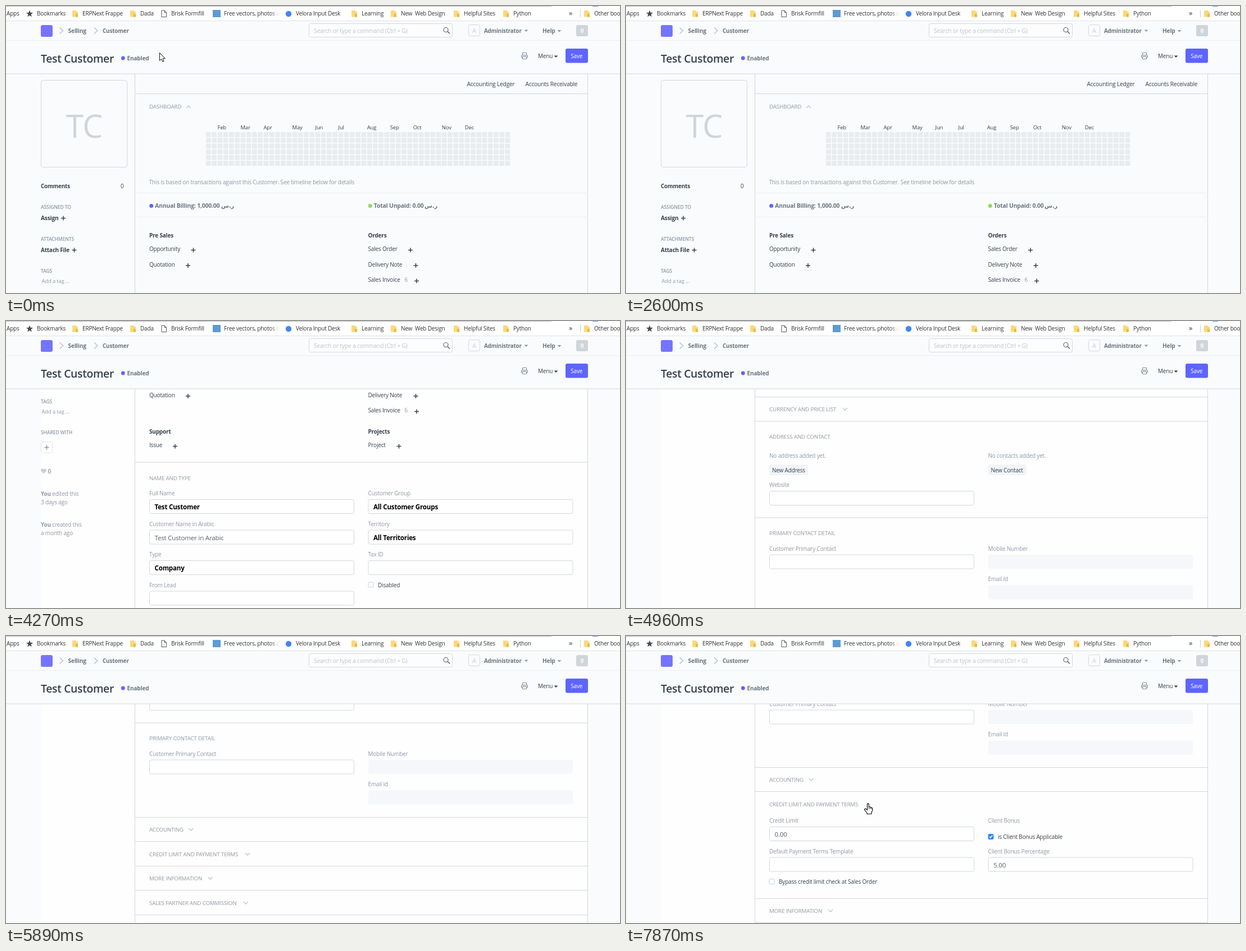
Write an HTML page with a canvas that moves like this. It is 1093 px wide and 512 px high and loops after 8000 ms.

```html
<!DOCTYPE html>
<html lang="en">
<head>
<meta charset="utf-8">
<title>Customer form</title>
<style>
html, body { margin: 0; width: 100%; height: 100%; overflow: hidden; background: #fafbfd; }
canvas { display: block; width: 1093px; height: 512px; }
</style>
</head>
<body>
<canvas id="stage" width="1093" height="512"></canvas>
<script>
const ctx = document.getElementById('stage').getContext('2d');
const LOOP = 8000, W = 1093, H = 512, TOP = 121;
const INK = '#36414c', MUTED = '#8d99a6', BORDER = '#d1d8dd', FAINT = '#ebeff2', ACCENT = '#5e64ff';
const LEFT = 255, RIGHT = 644.5;

// Time, then values
const SCROLL = [[4000, 0], [4270, 328], [4480, 545], [4810, 545], [4960, 723],
  [5310, 872], [5440, 908], [5860, 908], [6130, 1008]];
const POINTER = [[480, 273, 83], [760, 205, 42], [960, 150, 56], [1280, 64, 84], [1300, 64, 84],
  [1480, 270, 86], [1640, 490, 114], [1900, 938, 212], [2110, 938, 212], [2350, 1028, 218], [2590, 1096, 240]];
const RETURN = [[6440, 1066, 452], [6700, 880, 392], [7000, 560, 322], [7220, 439, 301], [7245, 438, 299], [7380, 431, 298]];

function track(keys, t) {
  if (t <= keys[0][0]) return keys[0].slice(1);
  for (let i = 1; i < keys.length; i++) {
    const a = keys[i - 1], b = keys[i];
    if (t < b[0]) {
      const k = (t - a[0]) / (b[0] - a[0]);
      return a.slice(1).map((v, j) => v + (b[j + 1] - v) * k);
    }
  }
  return keys[keys.length - 1].slice(1);
}

function text(str, x, y, color = INK, size = 10, weight = 400, align = 'left') {
  ctx.font = `${weight} ${size}px "Open Sans", "Noto Sans", sans-serif`;
  ctx.letterSpacing = `${-0.018 * size}px`;
  ctx.textAlign = align;
  ctx.fillStyle = color;
  ctx.fillText(str, x, y);
}
const bold = (str, x, y, color = INK, size = 10) => text(str, x, y, color, size, 700);
const label = (str, x, y) => text(str, x, y, MUTED);

function rect(x, y, w, h, color) {
  ctx.fillStyle = color;
  ctx.fillRect(x, y, w, h);
}
function box(x, y, w, h, r, fill, stroke) {
  ctx.beginPath();
  ctx.roundRect(x, y, w, h, r);
  if (fill) { ctx.fillStyle = fill; ctx.fill(); }
  if (stroke) { ctx.strokeStyle = stroke; ctx.lineWidth = 1; ctx.stroke(); }
}
function dot(x, y, r, color) {
  ctx.beginPath();
  ctx.arc(x, y, r, 0, 7);
  ctx.fillStyle = color;
  ctx.fill();
}
function shape(points, fill, stroke, width = 1, close = true) {
  ctx.beginPath();
  points.forEach(([x, y]) => ctx.lineTo(x, y));
  if (close) ctx.closePath();
  if (fill) { ctx.fillStyle = fill; ctx.fill(); }
  if (stroke) { ctx.strokeStyle = stroke; ctx.lineWidth = width; ctx.stroke(); }
}
const line = (points, color, width) => shape(points, null, color, width, false);
const rule = (y, color = BORDER) => rect(229, y, 807, 1, color);
const caret = (x, y, color) => shape([[x - 3.5, y - 1.5], [x + 3.5, y - 1.5], [x, y + 2]], color);
const chevron = (x, y, dir = 1) =>
  line([[x - 4, y - 2 * dir], [x, y + 2 * dir], [x + 4, y - 2 * dir]], '#c4ccd3', 1.6);

function plus(x, y, color = INK, r = 4) {
  rect(x - r, y - 0.75, 2 * r, 1.5, color);
  rect(x - 0.75, y - r, 1.5, 2 * r, color);
}
function link(str, x, y, plusX) {
  text(str, x, y);
  plus(plusX, y - 1.5);
}
function section(str, y, chevronX) {
  text(str, LEFT, y, MUTED, 9.8);
  if (chevronX) chevron(chevronX, y - 4);
}
function field(name, x, y, value, weight = 400) {
  label(name, x, y);
  box(x + 0.5, y + 7.5, 364, 25, 3, '#fff', BORDER);
  if (value) text(value, x + 9.5, y + 25, weight === 700 ? '#000' : '#55606a', 11.6, weight);
}
function locked(name, y) {
  label(name, RIGHT, y);
  box(RIGHT + 0.5, y + 7.5, 364, 25, 3, '#f5f7fa');
}
function checkbox(str, x, y, checked) {
  box(x + 0.5, y - 8.5, 9, 9, 1.5, checked ? '#2f86f0' : '#fff', checked ? '#2f86f0' : '#c8d0d6');
  if (checked) line([[x + 2.5, y - 4], [x + 4.3, y - 2], [x + 7.8, y - 6.3]], '#fff', 1.5);
  text(str, x + 17.5, y);
}
function button(str, x, y, w) {
  box(x, y, w, 19, 2, '#f0f4f7');
  text(str, x + 5, y + 14);
}

function folder(x) {
  shape([[x - 5, 8], [x + 2, 8], [x + 2, 10], [x + 5, 10], [x + 5, 19.5], [x - 5, 19.5]], '#fbd977');
  rect(x + 1, 14, 4, 5.5, '#e8b84a');
}

function bookmarks() {
  rect(0, 0, W, 26, '#fff');
  rect(0, 0, 971, 1, '#b9bbbf');
  rect(1044, 0, 10, 1, '#4d9be6');
  rect(0, 26, W, 1, '#dfe1e4');
  const name = (str, x) => text(str, x, 17, '#333');
  name('Apps', 1);
  const star = Array.from({ length: 10 }, (_, i) => {
    const r = i % 2 ? 2.7 : 6.4, a = i * Math.PI / 5 - Math.PI / 2;
    return [42 + r * Math.cos(a), 14 + r * Math.sin(a)];
  });
  shape(star, '#4a4a4a');
  name('Bookmarks', 55);
  [['ERPNext Frappe', 136], ['Dada', 239], ['Learning', 633], ['New  Web Design', 703],
    ['Helpful Sites', 815], ['Python', 903], ['Other bookmarks', 1047]].forEach(([str, x]) => {
    folder(x - 13);
    name(str, x);
  });
  shape([[277, 8], [282, 8], [285.5, 11.5], [285.5, 19.5], [277, 19.5]], '#fff', '#555');
  line([[282, 8], [282, 11.5], [285.5, 11.5]], '#555', 1);
  name('Brisk Formfill', 294);
  rect(368, 7, 14, 13, '#5c9bd3');
  const fade = ctx.createLinearGradient(472, 0, 486, 0);
  fade.addColorStop(0, '#333');
  fade.addColorStop(1, '#fff');
  ctx.save();
  ctx.beginPath();
  ctx.rect(388, 0, 98, 26);
  ctx.clip();
  text('Free vectors, photos and', 388, 17, fade);
  ctx.restore();
  dot(503, 14, 5.2, '#4285f4');
  name('Velora Input Desk', 516);
  text('»', 1002, 17, '#333', 13);
  rect(1022, 7, 1, 13, '#ccc');
}

function navbar() {
  rect(0, 27, W, 94, '#fafbfd');
  rect(0, 61, W, 1, FAINT);
  box(62, 34, 21, 21, 3, '#7574ff');
  [98.5, 160].forEach(x => line([[x - 3, 38.5], [x + 3, 44], [x - 3, 49.5]], '#b8c2cc', 1.5));
  bold('Selling', 110.5, 48, '#6c7680', 10.3);
  bold('Customer', 172, 48, '#6c7680', 9.9);
  box(539.5, 31.5, 255, 24, 3, '#fdfdfe', BORDER);
  text('Search or type a command (Ctrl + G)', 548, 48, '#bcc4cb', 10.3);
  ctx.beginPath();
  ctx.arc(783, 42.5, 4, 0, 7);
  ctx.strokeStyle = '#5c6670';
  ctx.lineWidth = 1.2;
  ctx.stroke();
  line([[786, 45.5], [790, 49.5]], '#5c6670', 1.6);
  box(823.5, 33.5, 20, 20, 3, null, BORDER);
  text('A', 833.5, 48, '#c9d0d6', 11, 400, 'center');
  bold('Administrator', 851, 48, '#6c7680', 9.8);
  caret(926, 44, MUTED);
  bold('Help', 955, 48, '#6c7680', 10.2);
  caret(985, 44.5, MUTED);
  box(1015, 34, 21, 20, 3, '#ced5db');
  text('0', 1025.5, 47.5, '#fff', 9.8, 700, 'center');
}

function header() {
  text('Test Customer', 62, 101, INK, 19.4, 600);
  dot(208.3, 93, 3.4, ACCENT);
  bold('Enabled', 215.5, 97, '#6c7680', 10.1);
  box(917.5, 87.5, 11, 5, 1, '#dfe4e8', '#7d8994');
  box(919.5, 83.5, 7, 4, 0, '#fff', '#7d8994');
  box(919.5, 90.5, 7, 4, 0, '#fff', '#7d8994');
  text('Menu', 947, 93);
  caret(979, 90, INK);
  box(996, 76, 40, 25.5, 3, ACCENT);
  text('Save', 1015.7, 93, '#fff', 10, 400, 'center');
  rect(0, 120.5, W, 1, BORDER);
}

function sidebar() {
  box(62.5, 132.5, 153, 155, 4, null, BORDER);
  text('TC', 139, 235, '#ced5db', 57, 400, 'center');
  const title = (str, y) => text(str, 62, y, MUTED, 8.6, 600);
  bold('Comments', 62, 325, INK, 9.9);
  text('0', 204, 325);
  title('ASSIGNED TO', 362);
  bold('Assign', 62, 382, INK, 10.2);
  plus(102, 378.5);
  title('ATTACHMENTS', 419);
  bold('Attach File', 62, 439, INK, 9.9);
  plus(121.5, 435.5);
  title('TAGS', 476);
  text('Add a tag ...', 63.5, 493.5, MUTED, 9.5);
  title('SHARED WITH', 531);
  ctx.setLineDash([2, 2]);
  box(62.5, 544.5, 20, 20, 3, null, '#c4ccd3');
  ctx.setLineDash([]);
  plus(72.5, 554.5, MUTED);
  dot(64.8, 595.3, 2.7, '#c8cfd5');
  dot(69.2, 595.3, 2.7, '#c8cfd5');
  shape([[62.3, 596.3], [71.7, 596.3], [67, 601.5]], '#c8cfd5');
  text('0', 74.5, 601, '#6c7680');
  [['edited this', '3 days ago', 641], ['created this', 'a month ago', 696]].forEach(([what, when, y]) => {
    bold('You', 62, y, MUTED, 9.9);
    label(what, 82.3, y);
    label(when, 62, y + 14.5);
  });
}

function amount(str, x, color, riyalX) {
  dot(x + 3.7, 356.5, 3.5, color);
  bold(str, x + 10.3, 360, '#6c7680', 10.4);
  ctx.font = '700 10px "DejaVu Sans", sans-serif';
  ctx.letterSpacing = '0px';
  ctx.fillText('ر.س', riyalX, 360);
}

function dashboard() {
  text('Accounting Ledger', 820.5, 143, INK, 10.2);
  text('Accounts Receivable', 924.5, 143, INK, 10.2);
  rule(156);
  section('DASHBOARD', 183);
  chevron(325, 180, -1);
  const months = [['Feb', 2], ['Mar', 6], ['Apr', 10], ['May', 15], ['Jun', 19], ['Jul', 23],
    ['Aug', 28], ['Sep', 32], ['Oct', 36], ['Nov', 41], ['Dec', 45]];
  const pitch = 10.24;
  months.forEach(([str, week]) => text(str, 356 + week * pitch, 220, INK, 9.5));
  for (let week = 0; week < 53; week++)
    for (let day = 0; day < 6; day++)
      rect(356 + week * pitch, 225 + day * pitch, 8.8, 8.8, '#e9ecef');
  label('This is based on transactions against this Customer. See timeline below for details', 254.5, 317.5);
  rule(333, FAINT);
  amount('Annual Billing: 1,000.00', LEFT, ACCENT, 383);
  amount('Total Unpaid: 0.00', RIGHT, '#98d85b', 745);
  rule(376, FAINT);

  bold('Pre Sales', LEFT, 413);
  link('Opportunity', LEFT, 437, 333.5);
  link('Quotation', LEFT, 464.5, 324);
  bold('Orders', RIGHT, 413);
  link('Sales Order', RIGHT, 437, 720);
  link('Delivery Note', RIGHT, 464.5, 729.5);
  link('Sales Invoice', RIGHT, 492, 731);
  label('6', 709.5, 492);
  bold('Support', LEFT, 530);
  link('Issue', LEFT, 554, 301);
  bold('Projects', RIGHT, 530);
  link('Project', RIGHT, 554, 699.5);
}

function details() {
  rule(580.5);
  section('NAME AND TYPE', 613);
  field('Full Name', LEFT, 640, 'Test Customer', 700);
  field('Customer Name in Arabic', LEFT, 694.5, 'Test Customer in Arabic');
  field('Type', LEFT, 749, 'Company', 700);
  field('From Lead', LEFT, 803.5);
  field('Customer Group', RIGHT, 640, 'All Customer Groups', 700);
  field('Territory', RIGHT, 694.5, 'All Territories', 700);
  field('Tax ID', RIGHT, 749);
  checkbox('Disabled', RIGHT, 803.5);

  rule(858);
  section('CURRENCY AND PRICE LIST', 884, 390);
  rule(901.5);
  section('ADDRESS AND CONTACT', 933);
  label('No address added yet.', LEFT, 967);
  button('New Address', LEFT, 979, 69);
  label('No contacts added yet.', RIGHT, 967);
  button('New Contact', RIGHT, 979, 68);
  field('Website', LEFT, 1019);

  rule(1073.5);
  section('PRIMARY CONTACT DETAIL', 1105);
  field('Customer Primary Contact', LEFT, 1132.5);
  locked('Mobile Number', 1132.5);
  locked('Email Id', 1187);
}

function creditTerms() {
  field('Credit Limit', LEFT, 1341, '0.00');
  field('Default Payment Terms Template', LEFT, 1395.5);
  checkbox('Bypass credit limit check at Sales Order', LEFT - 0.5, 1450);
  label('Client Bonus', RIGHT, 1341);
  checkbox('is Client Bonus Applicable', RIGHT, 1370, true);
  field('Client Bonus Percentage', RIGHT, 1395.5, '5.00');
}

function accordion(open) {
  const shift = open ? 147 : 0;
  const rows = [['ACCOUNTING', 329.5], ['CREDIT LIMIT AND PAYMENT TERMS', open ? 0 : 430],
    ['MORE INFORMATION', 364], ['SALES PARTNER AND COMMISSION', 427], ['SALES TEAM', 323]];
  rows.forEach(([str, x], i) => {
    const y = 1241.5 + i * 43.5 + (i > 1 ? shift : 0);
    rule(Math.round(y));
    section(str, Math.round(y + 26.5), x);
  });
  if (open) creditTerms();
  rule(1459 + shift);
  box(229.5, 1485.5 + shift, 806, 120, 3, null, BORDER);
  label('Add a comment', 242, 1505 + shift);
  button('Comment', 966.5, 1492 + shift, 56);
  rule(1515 + shift, FAINT);
}

function arrow(x, y) {
  shape([[0, 0], [0, 14], [3.2, 11.2], [5.4, 16], [7.6, 15], [5.5, 10.3], [9.8, 10.1]]
    .map(([dx, dy]) => [x + dx + 0.5, y + dy + 0.5]), '#fff', '#111');
}
function hand(x, y) {
  ctx.save();
  ctx.translate(x, y);
  ctx.lineJoin = 'round';
  shape([[-1.5, 1.5], [0, 0.5], [1.3, 1.8], [1.3, 6.5], [4, 7], [6, 8], [7.6, 9.2], [7.6, 13.5],
    [6, 16.5], [6, 19.5], [-2, 19.5], [-2, 17.5], [-6.5, 11.8], [-5.6, 10], [-3.8, 10.4], [-1.5, 12.5]],
    '#fff', '#111', 1.2);
  [1.3, 3.7, 5.8].forEach((dx, i) => line([[dx, 7 + i * 0.6], [dx, 10.5]], '#111', 0.9));
  ctx.restore();
}
function pointer(t) {
  if (t < 2600) return arrow(...track(POINTER, t));
  if (t < 6440) return;
  const [x, y] = track(RETURN, t);
  if (t >= 7250) return hand(x, y);
  arrow(x, y);
  if (t < 6600) {
    dot(x + 11, y + 1, 6.6, '#2294e6');
    dot(x + 11, y + 1, 3, '#dff1fd');
  }
}

function draw(t) {
  const scroll = Math.round(track(SCROLL, t)[0]);
  const open = t >= 7870;
  rect(0, 0, W, H, '#fafbfd');
  if (scroll) rect(62, TOP, 974, H - TOP, '#fefefe');
  ctx.save();
  ctx.beginPath();
  ctx.rect(0, TOP, W, H - TOP);
  ctx.clip();
  ctx.translate(0, -scroll);
  [229, 1035].forEach(x => rect(x, TOP, 1, (open ? 1606 : 1459) - TOP, BORDER));
  sidebar();
  dashboard();
  details();
  accordion(open);
  ctx.restore();
  bookmarks();
  navbar();
  header();
  pointer(t);
}

const start = performance.now();
function tick() {
  draw((performance.now() - start) % LOOP);
  requestAnimationFrame(tick);
}
tick();
</script>
</body>
</html>
```
